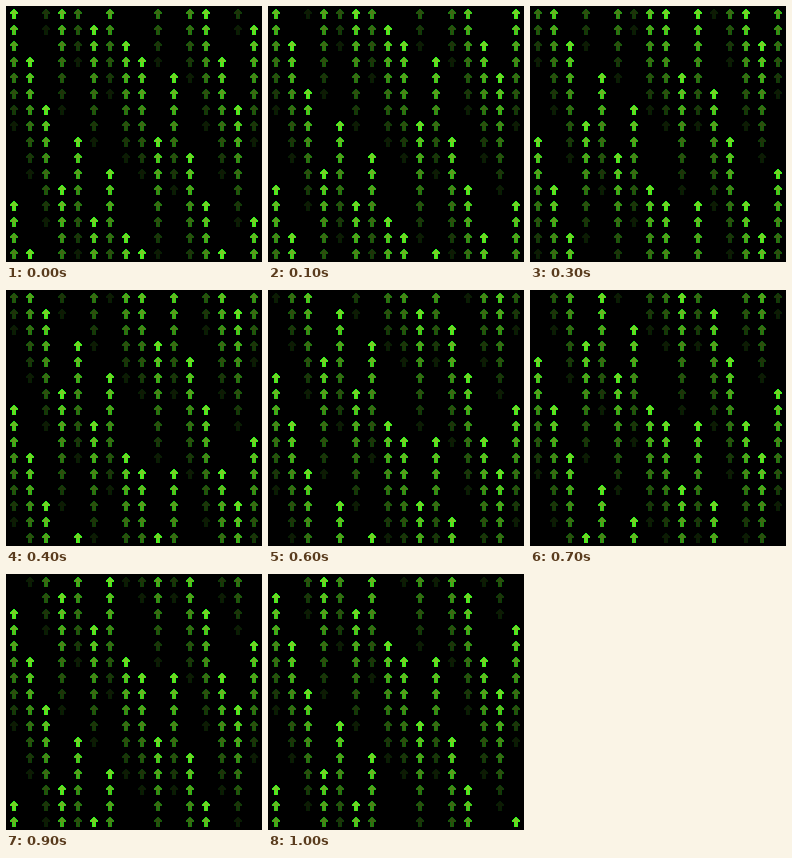
Animation of 256x256 px, one loop 1.1 s. Source, as an HTML page with a canvas:

```html
<!DOCTYPE html>
<html>
<head>
<meta charset="utf-8">
<style>
  html, body { margin: 0; width: 100%; height: 100%; overflow: hidden; background: #000; }
  canvas { display: block; }
</style>
</head>
<body>
<canvas id="stage" width="256" height="256"></canvas>
<script>
const ctx = document.getElementById('stage').getContext('2d');
const CELL = 16, ROWS = 16, PERIOD = 12, TRAIL = 8;
const STEP_MS = 100, STEPS = 11;

// Starting height of each column's stream, in rows.
const starts = [11.1, 2.1, 5.1, 10.1, 7.1, 0.1, 9.1, 2, 3, 7.1, 3.1, 8.1, 11.1, 3, 5.05, 1];

const shade = (r, g, b, light) => `rgb(${r * light}, ${g * light}, ${b * light})`;

// Green rim around a yellower core, built one pixel row at a time.
function arrow(col, row, light) {
  const x = col * CELL + 8, y = row * CELL + 3;
  for (let i = 0; i < 10; i++) {
    const half = i < 5 ? Math.min(i + 1, 4) : 2;
    ctx.fillStyle = shade(40, 255, 30, light);
    ctx.fillRect(x - half, y + i, half * 2, 1);
    ctx.fillStyle = shade(120, 205, 35, light);
    ctx.fillRect(x - half + 1, y + i, half * 2 - 2, 1);
  }
}

// Streams rise at one constant speed and snap to whole rows.
function draw(step) {
  ctx.fillStyle = '#000';
  ctx.fillRect(0, 0, 256, 256);
  const climb = step * PERIOD / STEPS;
  starts.forEach((start, col) => {
    const head = Math.ceil(start - climb);
    for (let row = 0; row < ROWS; row++) {
      const age = (row - head + PERIOD) % PERIOD;
      if (age < TRAIL) arrow(col, row, 1 - age / TRAIL);
    }
  });
}

const began = performance.now();
function tick() {
  const time = Math.max(0, performance.now() - began);
  draw(Math.floor(time / STEP_MS) % STEPS);
  requestAnimationFrame(tick);
}
tick();
</script>
</body>
</html>
```
